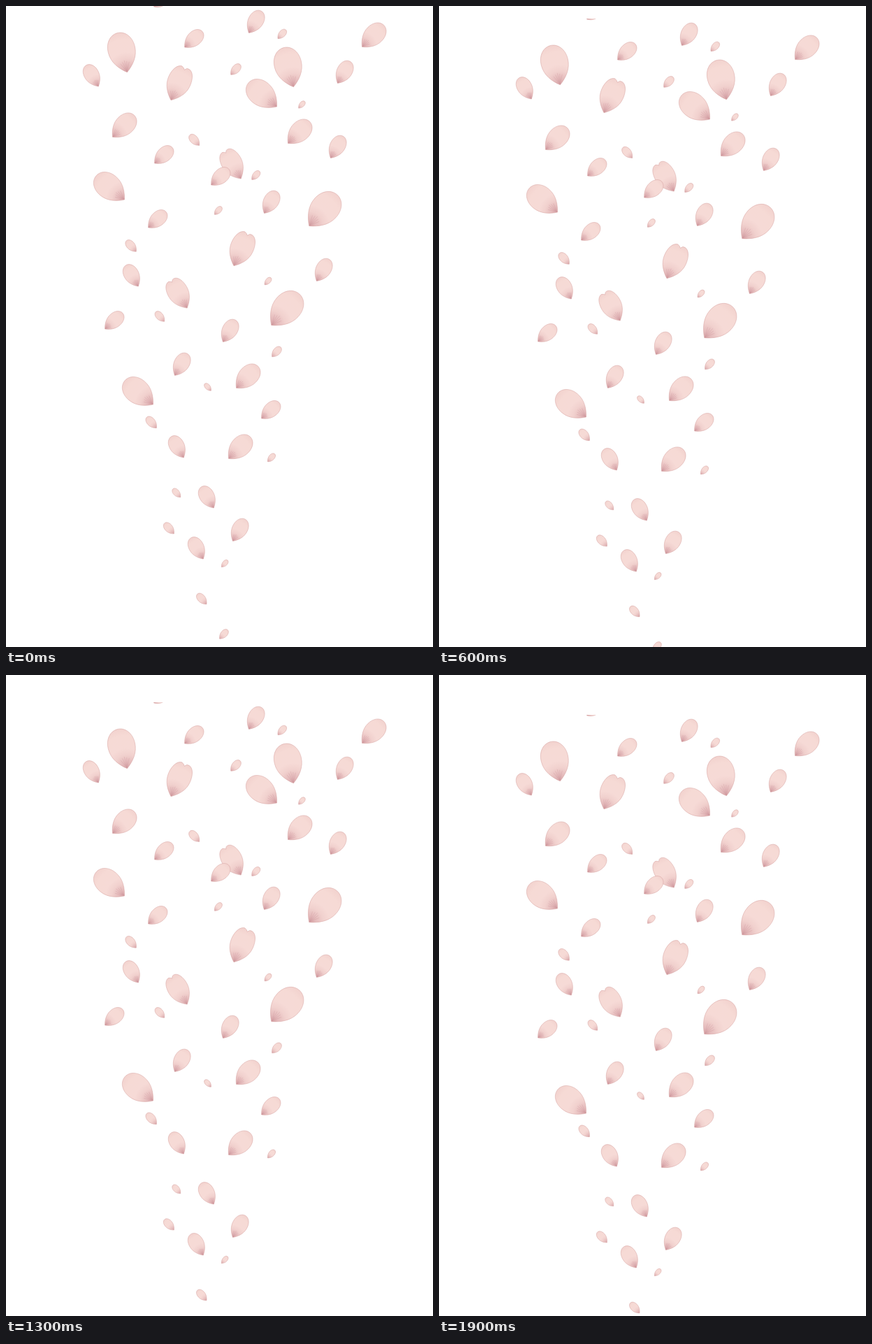
Write an HTML page that moves like this. It is 611 by 917 pixels and loops after 2 s.

```html
<!DOCTYPE html>
<html lang="en">
<head>
<meta charset="utf-8">
<title>Falling petals</title>
<style>
  html, body { margin: 0; width: 100%; height: 100%; overflow: hidden; background: #fff; }
  svg { display: block; overflow: hidden; }
  .outline { fill: url(#blush); stroke: #d5a09f; stroke-width: .6; stroke-opacity: .85; vector-effect: non-scaling-stroke; }
  .vein { fill: none; stroke: #c98f96; stroke-width: .6; stroke-opacity: .5; vector-effect: non-scaling-stroke; }
</style>
</head>
<body>
<svg id="petals" width="611" height="917" viewBox="0 0 611 917">
  <defs>
    <radialGradient id="blush" gradientUnits="userSpaceOnUse" cx="0" cy="0" r="1">
      <stop offset="0" stop-color="#d5a1a5"/>
      <stop offset=".15" stop-color="#e4babb"/>
      <stop offset=".34" stop-color="#f1d1ce"/>
      <stop offset=".5" stop-color="#f6dad6"/>
      <stop offset=".82" stop-color="#f6dad5"/>
      <stop offset="1" stop-color="#f2d2ce"/>
    </radialGradient>
  </defs>
</svg>
<script>
  const svg = document.getElementById('petals');
  const placed = [];

  function add(parent, tag, attrs) {
    const node = document.createElementNS('http://www.w3.org/2000/svg', tag);
    for (const key in attrs) node.setAttribute(key, attrs[key]);
    return parent.appendChild(node);
  }

  // Unit-length outline with the tip at the origin, r is half the width.
  function outline(r, notch) {
    const end = notch
      ? `C.8 ${-r} .98 ${-.75 * r} 1 ${-.32 * r} Q.98 ${-.1 * r} .93 0
         Q1.02 ${.12 * r} 1 ${.36 * r} C.98 ${.75 * r} .8 ${r} .58 ${r}`
      : `C.83 ${-r} 1 ${-.55 * r} 1 0 C1 ${.55 * r} .83 ${r} .58 ${r}`;
    return `M0 0 C.13 ${-.5 * r} .32 ${-r} .58 ${-r} ${end} C.32 ${r} .13 ${.5 * r} 0 0Z`;
  }

  const veins = [-2, -1, 0, 1, 2].map(i =>
    `M.02 0 Q.12 ${i * .025} ${.3 - Math.abs(i) * .03} ${i * .055}`).join('');

  // Tilt is measured from upright; longer petals are also broader.
  function petal(x, y, length, tilt, notch) {
    const width = .5 + .003 * length;
    const group = add(svg, 'g', {
      transform: `translate(${x} ${y}) rotate(${tilt - 90}) scale(${length}) translate(-.53 0)`
    });
    add(group, 'path', { d: outline(width / 2, notch), class: 'outline' });
    if (length > 25) add(group, 'path', { d: veins, class: 'vein' });
    placed.push({ x, y, length });
  }

  function cluster(length, tilt, points, notch = false) {
    for (const [x, y] of points) petal(x, y, length, tilt, notch);
  }

  // Large petals.
  cluster(58, -14, [[404, 86], [166, 65]]);
  cluster(53, -50, [[148, 259], [366, 126], [189, 552]]);
  cluster(46, -30, [[247, 411], [324, 226]], true);
  cluster(51, 24, [[247, 110], [337, 347]], true);
  cluster(60, 42, [[401, 433], [455, 291]]);
  cluster(44, 45, [[420, 180], [526, 42], [169, 171], [346, 530], [335, 631]]);

  // Medium petals.
  cluster(35, -30, [[180, 385], [273, 775], [123, 99], [245, 630], [288, 702]]);
  cluster(36, 30, [[357, 22], [484, 94], [379, 280], [320, 464],
    [474, 201], [454, 377], [251, 512], [334, 749]]);
  cluster(34, 48, [[379, 578], [269, 47], [217, 305], [226, 213], [307, 244], [155, 450]]);

  // Small petals fill the gaps of a funnel that narrows downwards.
  const axis = 298, golden = .618034;
  const isClear = (x, y, length) =>
    placed.every(p => Math.hypot(p.x - x, p.y - y) > (p.length + length) / 2 + 4);
  let spread = .1;
  for (let i = 0; i < 18; i++) {
    const y = 40 + i * 50.5;
    const length = 17 + 4 * Math.sin(i * 2.4);
    const reach = 230 * (1 - y / 930) ** .75;
    let x;
    do {
      spread = (spread + golden) % 1;
      x = axis + reach * (2 * spread - 1);
    } while (!isClear(x, y, length));
    petal(x, y, length, x < axis - 8 ? -42 : 42);
  }

  // Cut off by the top edge.
  petal(221, -5, 21, 58);

  svg.animate(
    [{ transform: 'translateY(0)' }, { transform: 'translateY(60px)' }],
    { duration: 2000, iterations: Infinity, easing: 'steps(20, end)' }
  );
</script>
</body>
</html>
```
